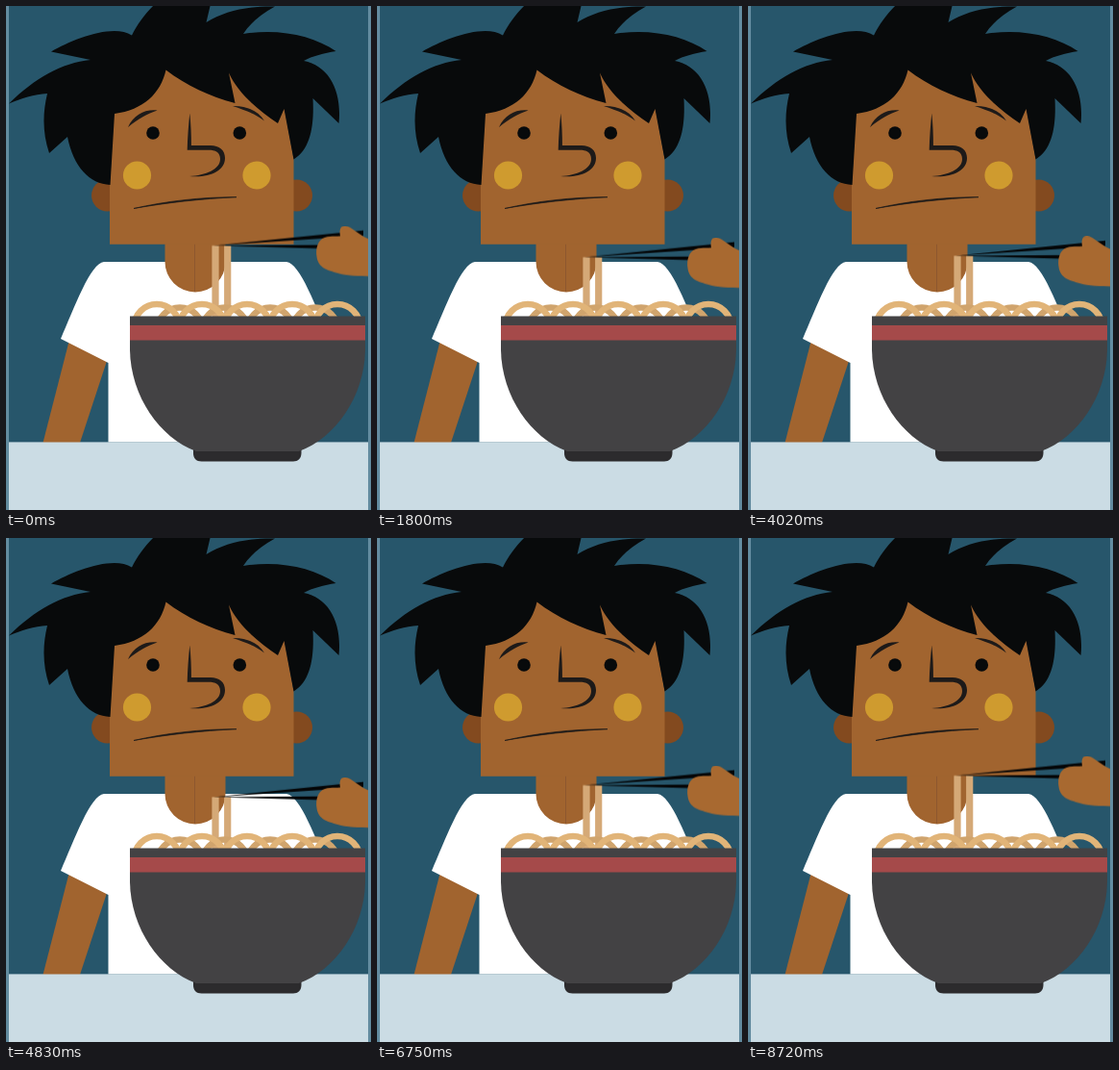
These frames come from a looping animation (380 by 524 pixels, 8750 ms). An HTML page:

```html
<!DOCTYPE html>
<html lang="en">
<head>
<meta charset="utf-8">
<title>Noodles</title>
<style>
  html, body { margin: 0; width: 100%; height: 100%; overflow: hidden; background: #638ca0; }
  svg { display: block; width: 380px; height: 524px; }
  .skin { fill: #a1642f; }
  .ink { fill: #1d1a19; }
  .hair { fill: #080a0b; }
  .cheek { fill: #cf9b2f; }
</style>
</head>
<body>
<svg viewBox="0 0 380 524">
  <defs>
    <clipPath id="room"><rect x="3" width="374" height="524"/></clipPath>
  </defs>
  <rect width="380" height="524" fill="#638ca0"/>

  <g clip-path="url(#room)">
    <rect x="3" width="374" height="453.500" fill="#27566b"/>

    <!-- body -->
    <path class="skin" d="M66 347L105 369L77 454H38.500Z"/>
    <path fill="#fff" d="M102 266H292C306 267 323 314 337 346L288 371V453.500H106.500V371L57 346C71 314 88 267 102 266Z"/>
    <path class="skin" d="M165.500 245H228.500V266A31.500 31.500 0 0 1 165.500 266Z"/>
    <path d="M196.500 247V297" stroke="#885530" stroke-width=".8"/>

    <!-- head -->
    <g fill="#834a1f">
      <circle cx="105.500" cy="197" r="16.500"/>
      <circle cx="302.500" cy="197" r="16.500"/>
    </g>
    <path class="skin" d="M113 100L150 50H250L290 107L299.500 159V247.700H108V186Z"/>
    <path class="hair" d="M3 101.500C30 75 58 59 88 56L47 47.500C70 34 112 18 131 30.500C137 18 145 8 155 -2H213L208.500 17C228 5 252 0 280 0.500C265 9 254 18 247 29C285 23 320 31 343.500 47C331 49 319 52 310 57C336 62 350 88 346.500 122L319.500 96C321 125 317 149 299.500 159.500L289.500 107L283 122C264 109 242 92 232 69.500L238.500 101C212 94 188 83 166.500 66.500C161 91 143 108 113 112L108.500 186C87 185 70 167 64 136L45 153C38 132 38 112 43 91C29 92 16 96 3 101.500Z"/>

    <!-- face -->
    <g class="ink">
      <path d="M127 126C133 113 145 107 157.500 108.500C147 112 138 117 127 126Z"/>
      <path d="M236 104C250 103.500 263 109 269 119.500C260 112 249 108.500 236 104Z"/>
      <path d="M191.300 111.500C192.500 123 193 135 192.900 145H213C222 145 228 150 228 158C228 172 211 179 191 177C208 176 223 170 223 159C223 152 218 149.700 211 149.700H188.700C189 137 190 124 191.300 111.500Z"/>
      <path d="M133 210.500C166 203 203 198.500 240 198.700C203 200.500 167 204.500 133 210.500Z" stroke="#1d1a19" stroke-width=".7"/>
    </g>
    <circle class="hair" cx="153" cy="132" r="6.800"/>
    <circle class="hair" cx="243.300" cy="132" r="6.800"/>
    <circle class="cheek" cx="136.500" cy="176" r="14.600"/>
    <circle class="cheek" cx="261" cy="176" r="14.600"/>

    <!-- lifted noodles, chopsticks and hand -->
    <g id="lift">
      <path d="M218 247.600V400M230.700 247.600V400" stroke="#d5a977" stroke-width="7.200"/>
      <path fill="#040506" d="M216 247.500L372 231.800V237.200Z"/>
      <path fill="#040506" d="M216 247.500L335 246.800V250.800Z"/>
      <path fill="#a86930" d="M348 237.500C347 232 347.500 227 353 227C360 227 368 238 380 241.500V279.500C367 279 354 279 345 276C335 273 325 271 323.500 259C322 250 325 241 332 239C337 237 343 238 348 237.500Z"/>
    </g>
  </g>

  <!-- bowl and table -->
  <g id="noodles" fill="none" stroke-width="6.500"></g>
  <rect x="3" y="453.500" width="374" height="70.500" fill="#cbdce4"/>
  <path fill="#2c2b2d" d="M195 460H307.500V465C307.500 470 304 473.500 299 473.500H203.500C198 473.500 195 470 195 465Z"/>
  <path fill="#434244" d="M129 322.500H374V358C373 406 343 449 305 463H198C160 449 130 406 129 358Z"/>
  <path fill="#a54a4a" d="M129 332H374V347.500H129Z"/>
</svg>
<script>
  const noodles = document.getElementById("noodles");

  function addLoops(x, y, count, color) {
    for (let i = 0; i < count; i++) {
      const loop = document.createElementNS("http://www.w3.org/2000/svg", "path");
      loop.setAttribute("d", `M${x + i * 47 - 23.5} ${y + 24}a23.500 23.500 0 0 1 47 0`);
      loop.setAttribute("stroke", color);
      noodles.append(loop);
    }
  }
  addLoops(181, 313, 4, "#d0a46d");
  addLoops(157, 309.5, 5, "#e1b478");

  // Steady up-and-down travel, four round trips per loop.
  const halfTrip = 8750 / 8;
  document.getElementById("lift").animate(
    [{ transform: "translateY(-1.6px)" }, { transform: "translateY(48.6px)" }],
    { duration: halfTrip, delay: -53.5, direction: "alternate", iterations: Infinity }
  );
</script>
</body>
</html>
```
